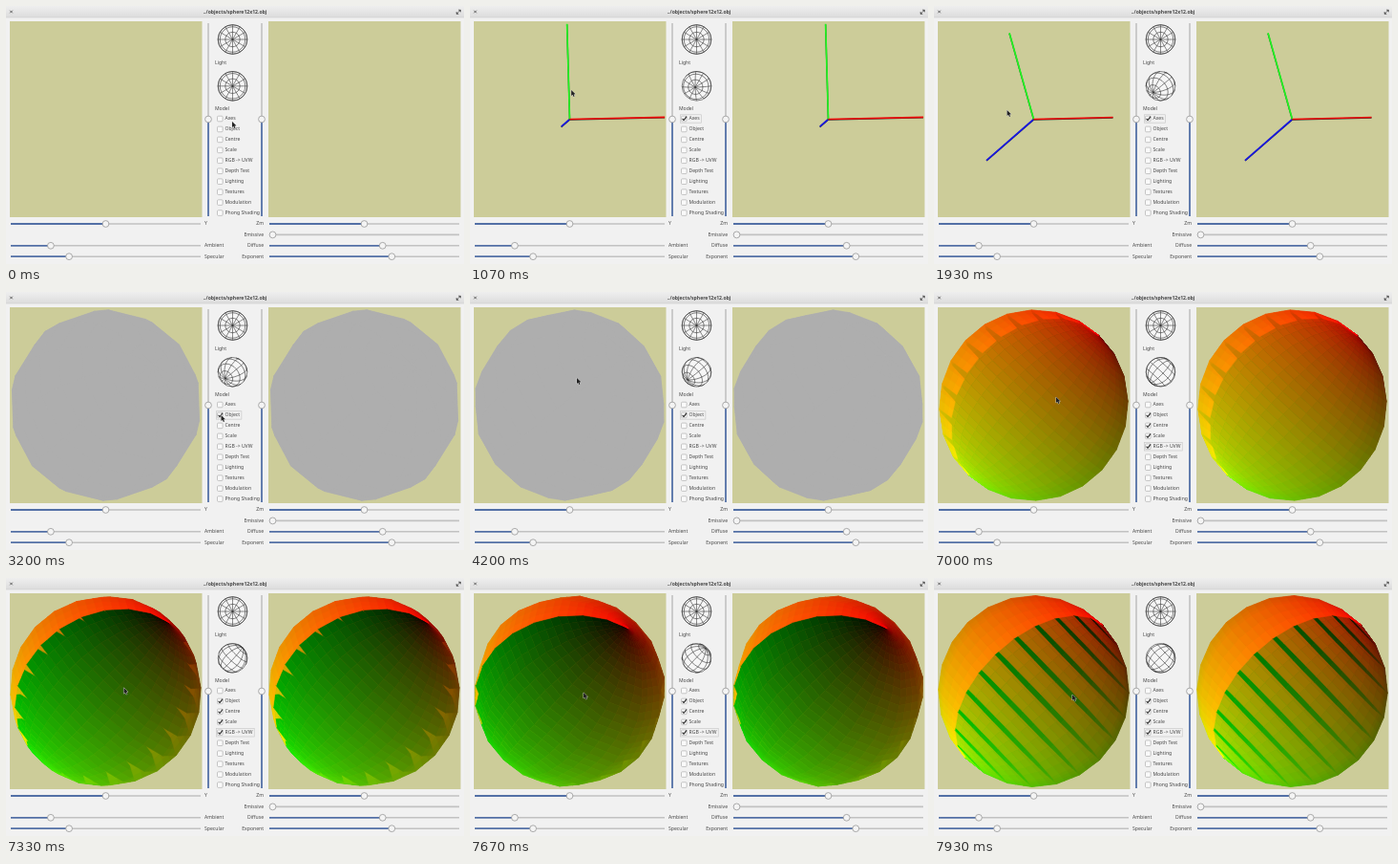
These frames come from a looping animation (480 by 270 pixels, 8000 ms). An HTML page with a canvas:

```html
<!DOCTYPE html>
<html lang="en">
<head>
<meta charset="utf-8">
<title>Object viewer</title>
<style>
html, body { margin: 0; width: 100%; height: 100%; overflow: hidden; background: #f1f1f1; }
canvas { display: block; width: 480px; height: 270px; }
</style>
</head>
<body>
<canvas id="stage" width="480" height="270"></canvas>
<script>
const ctx = document.getElementById('stage').getContext('2d');
const LOOP = 8000, STEP = 1000 / 15, RAD = Math.PI / 180;
const BLUE = '#5370a6', GROOVE = '#c2c2c2', INK = '#484848';
const SANS = '"Noto Sans", "Open Sans", sans-serif';

const OPTIONS = ['Axes', 'Object', 'Centre', 'Scale', 'RGB -> UVW',
  'Depth Test', 'Lighting', 'Textures', 'Modulation', 'Phong Shading'];
const rowY = i => 118 + i * 10.95;

// Each click toggles one option
const CLICKS = [
  { at: 400, option: 0 }, { at: 2930, option: 0 }, { at: 3200, option: 1 },
  { at: 4870, option: 2 }, { at: 5900, option: 3 }, { at: 6370, option: 4 }
];
// Pointer in the view: [ms, x, y]
const WANDER = [
  [0, 237, 121], [900, 112, 84], [1930, 76, 109], [3600, 108, 76],
  [4200, 112, 90], [5200, 116, 92], [7000, 128, 110], [7670, 119, 120], [7930, 145, 122]
];
// The pointer rests on a box before each click
const POINTER = WANDER.concat(CLICKS.flatMap(c =>
  [c.at - 170, c.at].map(t => [t, 225.5, rowY(c.option)]))).sort((a, b) => a[0] - b[0]);

// Drags turn the model to a pose: pole heading, pole tilt to the viewer, seam angle
const REST = [221, 89.9, 49];
const DRAGS = [
  { from: 900, to: 1930, pose: [221, 49, 58] },
  { from: 3600, to: 4470, pose: [221, 32, 55] },
  { from: 5170, to: 5470, pose: [227, 3, 50] },
  { from: 7000, to: 7670, pose: [227, -26, 62] },
  { from: 7670, to: 7930, pose: [224, -1.7, 34] }
];
const SLIDERS = [
  { label: 'Y', side: 0, row: 0, value: 0.5 }, { label: 'Zm', side: 1, row: 0, value: 0.5 },
  { label: 'Emissive', side: 1, row: 1, value: 0 },
  { label: 'Ambient', side: 0, row: 2, value: 0.2 }, { label: 'Diffuse', side: 1, row: 2, value: 0.6 },
  { label: 'Specular', side: 0, row: 3, value: 0.3 }, { label: 'Exponent', side: 1, row: 3, value: 0.65 }
];

const clamp = p => Math.min(1, Math.max(0, p));
const lerp = (a, b, p) => a.map((v, i) => v + (b[i] - v) * p);
const mix = (a, p, b, q) => a.map((v, i) => v * p + b[i] * q);

function pointerAt(t) {
  const next = POINTER.findIndex(k => k[0] > t);
  if (next < 0) return POINTER.at(-1).slice(1);
  const a = POINTER[next - 1], b = POINTER[next];
  return lerp(a, b, (t - a[0]) / (b[0] - a[0])).slice(1);
}

const poseAt = t => DRAGS.reduce(
  (pose, d) => lerp(pose, d.pose, clamp((t - d.from) / (d.to - d.from))), REST);

function basis([heading, tilt, seam]) {
  const [h, t, s] = [heading, tilt, seam].map(d => d * RAD);
  const flat = [Math.cos(h), Math.sin(h), 0], front = [0, 0, 1];
  const z = mix(flat, Math.cos(t), front, Math.sin(t));
  const f = mix(flat, -Math.sin(t), front, Math.cos(t));
  const side = [Math.sin(h), -Math.cos(h), 0];
  return {
    x: mix(f, Math.sin(s), side, -Math.cos(s)),
    y: mix(f, Math.cos(s), side, Math.sin(s)),
    z
  };
}

// u runs round the pole from the y axis; v runs from the -z pole to the +z pole
function onSphere(b, u, v) {
  const lon = u * 2 * Math.PI, lat = (v - 0.5) * Math.PI;
  const ring = mix(b.y, Math.cos(lon), b.x, Math.sin(lon));
  return mix(ring, Math.cos(lat), b.z, Math.sin(lat));
}

function line(x1, y1, x2, y2, color, width) {
  ctx.strokeStyle = color;
  ctx.lineWidth = width;
  ctx.beginPath();
  ctx.moveTo(x1, y1);
  ctx.lineTo(x2, y2);
  ctx.stroke();
}

function text(str, x, y, align = 'left', weight = 400) {
  ctx.font = `${weight} 5.1px ${SANS}`;
  ctx.textAlign = align;
  ctx.textBaseline = 'middle';
  ctx.fillStyle = INK;
  ctx.fillText(str, x, y);
}

function circle(x, y, r, fill, stroke, width) {
  ctx.beginPath();
  ctx.arc(x, y, r, 0, 7);
  ctx.fillStyle = fill;
  ctx.fill();
  ctx.strokeStyle = stroke;
  ctx.lineWidth = width;
  ctx.stroke();
}

const knob = (x, y) => circle(x, y, 3.4, '#f4f4f4', '#999', 0.8);

function fillPoly(points, color) {
  ctx.beginPath();
  for (const p of points) ctx.lineTo(p[0], p[1]);
  ctx.closePath();
  ctx.fillStyle = ctx.strokeStyle = color;
  ctx.lineWidth = 0.5;
  ctx.fill();
  ctx.stroke();
}

function sphere(b, cx, cy, r, colored) {
  const N = 12, parts = colored ? 3 : 1;
  const corner = (i, j) => {
    const p = onSphere(b, i / N, j / N);
    return [cx + p[0] * r, cy - p[1] * r];
  };
  // Faces paint in mesh order, with no depth sorting
  for (let j = N - 1; j >= 0; j--) {
    for (let i = 0; i < N; i++) {
      const a = corner(i, j), c = corner(i + 1, j), d = corner(i, j + 1), e = corner(i + 1, j + 1);
      const at = (p, q) => lerp(lerp(a, c, p / parts), lerp(d, e, p / parts), q / parts);
      for (let n = 0; n < parts * parts; n++) {
        const p = n % parts, q = Math.floor(n / parts);
        const red = 255 * (i + (p + 0.5) / parts) / N;
        const green = 255 * (j + (q + 0.5) / parts) / N;
        fillPoly([at(p, q), at(p + 1, q), at(p + 1, q + 1), at(p, q + 1)],
          colored ? `rgb(${red | 0},${green | 0},0)` : '#aeaeae');
      }
    }
  }
}

function viewport(left, b, on) {
  const cx = left + 100.5, cy = 118.5;
  ctx.save();
  ctx.beginPath();
  ctx.rect(left, 16, 201.5, 205);
  ctx.clip();
  ctx.fillStyle = '#cccc99';
  ctx.fillRect(left, 16, 202, 205);
  if (on[1]) sphere(b, cx, cy, 100, on[4]);
  if (on[0]) {
    for (const [axis, color] of [[b.z, '#1818e0'], [b.y, '#20f520'], [b.x, '#ee0808']]) {
      const x = cx + axis[0] * 100, y = cy - axis[1] * 100;
      line(cx, cy + 0.5, x, y + 0.5, '#333', 1.4);
      line(cx, cy, x, y, color, 1.7);
    }
  }
  ctx.restore();
}

function globe(b, cx, cy) {
  const r = 15.3;
  circle(cx, cy, r, '#f6f6f6', '#333', 0.6);
  const trace = point => {
    let down = false;
    for (let k = 0; k <= 24; k++) {
      const p = point(k / 24), front = p[2] > -0.02;
      ctx[front && down ? 'lineTo' : 'moveTo'](cx + p[0] * r, cy - p[1] * r);
      down = front;
    }
  };
  ctx.beginPath();
  for (let i = 0; i < 12; i++) trace(s => onSphere(b, i / 12, s));
  for (let j = 1; j < 6; j++) trace(s => onSphere(b, s, j / 6));
  ctx.stroke();
}

function option(label, y, checked, focused) {
  ctx.beginPath();
  ctx.roundRect(221.5, y - 2.8, 5.6, 5.6, 1);
  ctx.fillStyle = '#fafafa';
  ctx.fill();
  ctx.strokeStyle = '#b0b0b0';
  ctx.lineWidth = 0.7;
  ctx.stroke();
  if (checked) {
    line(222.6, y - 0.2, 224, y + 1.6, '#333', 1.2);
    line(224, y + 1.6, 227, y - 2.4, '#333', 1.2);
  }
  text(label, 229.5, y);
  if (focused) {
    ctx.strokeStyle = '#c4c4c4';
    ctx.lineWidth = 0.6;
    ctx.strokeRect(220.3, y - 4.2, ctx.measureText(label).width + 11, 8.4);
  }
}

function titleBar() {
  const shade = ctx.createLinearGradient(0, 0, 0, 12);
  shade.addColorStop(0, '#eeeeee');
  shade.addColorStop(1, '#dcdcdc');
  ctx.fillStyle = shade;
  ctx.fillRect(0, 0, 480, 12);
  line(0, 12, 480, 12, '#cfcfcf', 0.6);
  text('../objects/sphere12x12.obj', 240, 6.3, 'center', 600);
  line(4.2, 4.7, 6.8, 7.3, '#555', 0.9);
  line(6.8, 4.7, 4.2, 7.3, '#555', 0.9);
  line(472.5, 8, 476, 4.5, '#555', 0.8);
  fillPoly([[474.3, 4], [476.5, 4], [476.5, 6.2]], '#555');
  fillPoly([[472, 6.3], [472, 8.5], [474.2, 8.5]], '#555');
}

function sliders() {
  for (const x of [212, 268]) {
    line(x, 18, x, 118, GROOVE, 1.6);
    line(x, 118, x, 220, BLUE, 1.8);
    knob(x, 118.5);
  }
  for (const { label, side, row, value } of SLIDERS) {
    const start = 5 + side * 271, y = 228 + row * 11.4, x = start + 3.5 + value * 192;
    line(x, y, start + 199, y, GROOVE, 1.6);
    line(start, y, x, y, BLUE, 1.8);
    knob(x, y);
    text(label, side ? 270 : 208, y, side ? 'right' : 'left');
  }
}

function pointer([x, y]) {
  const shape = [[0, 0], [0, 6], [1.4, 4.8], [2.4, 7], [3.4, 6.5], [2.5, 4.4], [4.3, 4.2]];
  ctx.beginPath();
  for (const [dx, dy] of shape) ctx.lineTo(x + dx, y + dy);
  ctx.closePath();
  ctx.strokeStyle = '#ddd';
  ctx.lineWidth = 0.8;
  ctx.stroke();
  ctx.fillStyle = '#222';
  ctx.fill();
}

function draw(t) {
  const done = CLICKS.filter(c => c.at <= t);
  const on = OPTIONS.map((_, i) => done.filter(c => c.option === i).length % 2 === 1);
  const model = basis(poseAt(t));
  ctx.fillStyle = '#f1f1f1';
  ctx.fillRect(0, 0, 480, 270);
  titleBar();
  viewport(4, model, on);
  viewport(275, model, on);
  globe(basis(REST), 237.5, 35);
  text('Light', 219, 59.5);
  globe(model, 237.5, 83.8);
  text('Model', 219, 108);
  OPTIONS.forEach((label, i) => option(label, rowY(i), on[i], i === done.at(-1)?.option));
  sliders();
  pointer(pointerAt(t));
}

let shown = -1;
const begin = performance.now();
function tick() {
  const step = Math.floor(((performance.now() - begin) % LOOP) / STEP + 0.05);
  if (step !== shown) {
    shown = step;
    draw(step * STEP);
  }
  requestAnimationFrame(tick);
}
tick();
</script>
</body>
</html>
```
